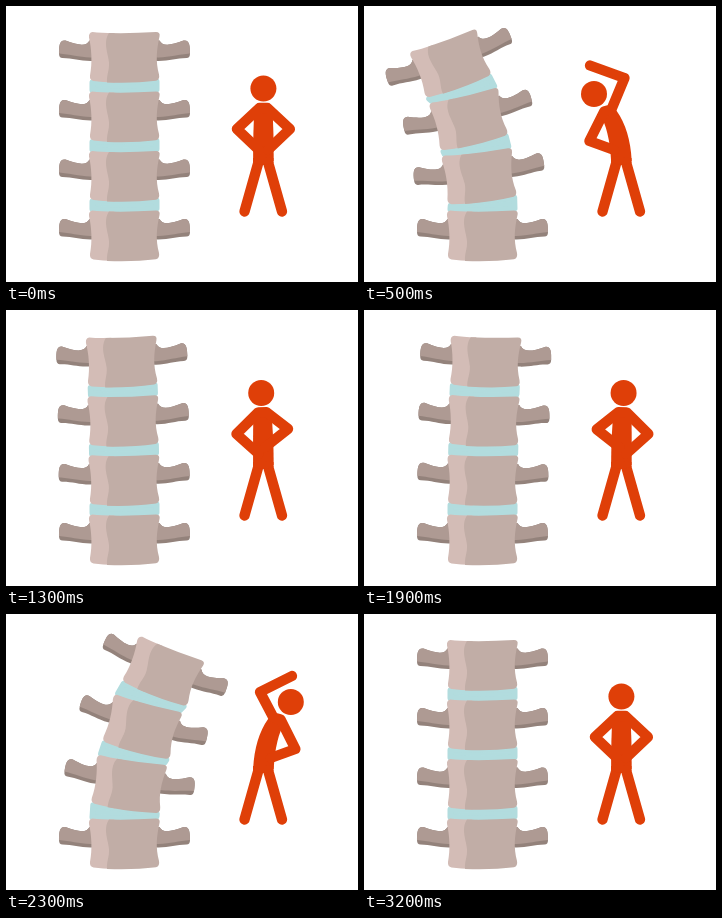
These frames come from a looping animation (352 px wide and 276 px high, 3600 ms). An HTML page:

```html
<!DOCTYPE html>
<html lang="en">
<head>
<meta charset="utf-8">
<title>Side bends</title>
<style>
  html, body { margin: 0; width: 100%; height: 100%; overflow: hidden; background: #fff; }
  svg { display: block; width: 100vw; height: 100vh; }
</style>
</head>
<body>
<svg viewBox="0 0 352 276">
  <defs>
    <g id="process">
      <path fill="#93827b" d="M-28-8H-35C-38-2-46-3-59-8C-65-9-65.500-3-65.500 5Q-65.500 9.500-62 9.500C-52 9.500-45 12.500-34 12.500H-28Z"/>
      <path fill="#ae9a93" d="M-28-8H-35C-38-2-46-3-59-8C-65-9-65.500-3-65.500 5C-54 6-46 8.500-34 9H-28Z"/>
    </g>
    <g id="vertebra">
      <use href="#process"/>
      <use href="#process" transform="scale(-1 1)"/>
      <path fill="#d3bcb6" d="M-32-16.500Q-24-15.500-10-15.500V34Q-22 33.500-31 32.500Q-35 31.500-34.500 27C-32 14-33 0-35.500-11Q-36-16-32-16.500Z"/>
      <path fill="#c1ada6" d="M-15.500-15.500Q8-15 31.500-16.500Q36-16.500 35-12C32 2 31 12 34.500 26Q35.500 31 31.500 32.300Q10 35-17.500 34C-18 26-15 22-15.500 14C-16 6-22-6-15.500-15.500Z"/>
    </g>
  </defs>
  <g id="discs" fill="#b2dcde" stroke="#b2dcde" stroke-width="6" stroke-linejoin="round"></g>
  <g id="spine"></g>
  <g fill="#df3f08" stroke="#df3f08" stroke-width="10.300" stroke-linecap="round" stroke-linejoin="round">
    <g id="upper">
      <path id="torso" stroke="none"/>
      <circle id="head" r="13" stroke="none"/>
      <path id="arms" fill="none"/>
    </g>
    <path d="M238.500 205.500L252.500 156M276 205.500L262 156" fill="none"/>
    <path d="M247 152H267.500V157L257.300 159L247 157Z" stroke="none"/>
  </g>
</svg>
<script>
const LOOP = 3600, MOVE = 900, REST = 100, STEP = 100, STEPS = 5;
const SPINE_X = 118.5, SPINE_Y = 42.5, GAP = 59.5;
const PERSON_X = 257.4;

// The spine leans along shift * level^curve; elbow and hand belong to the raised arm.
const LEFT = { sign: -1, shift: 3.9, curve: 1.98, turn: 6.6, elbow: [3.1, 72], hand: [-31.4, 59.5] };
const RIGHT = { sign: 1, shift: 5.5, curve: 1.84, turn: 8.6, elbow: [3.4, 78], hand: [-28.6, 62] };

// Person drawn leaning left, x measured from its middle; right is the mirror image.
const ARM = [[-4.4, 144], [-26.5, 123], [-4, 102]];
const ARM_LEAN = [[-7.2, 144], [-32, 135], [-17.2, 105.5]];
const SHOULDER_LEAN = [-10, 103.5];

const $ = id => document.getElementById(id);
const flip = ([x, y]) => [-x, y];
const mix = (a, b, p) => a.map((v, i) => v + (b[i] - v) * p);
const text = ([x, y]) => x.toFixed(2) + " " + y.toFixed(2);
const easeInOut = t => t < 0.5 ? 2 * t * t : 1 - 2 * (1 - t) ** 2;

function add(parent, tag, attrs = {}) {
  const el = document.createElementNS("http://www.w3.org/2000/svg", tag);
  for (const key in attrs) el.setAttribute(key, attrs[key]);
  return parent.appendChild(el);
}

const discs = Array.from({ length: 3 }, () => add($("discs"), "path"));
const bones = Array.from({ length: 4 }, () => add($("spine"), "use", { href: "#vertebra" }));

function place({ x, y, angle }, [px, py]) {
  const a = angle * Math.PI / 180;
  return [x + px * Math.cos(a) - py * Math.sin(a), y + px * Math.sin(a) + py * Math.cos(a)];
}

function drawSpine(side, p) {
  const poses = bones.map((bone, i) => {
    const level = bones.length - 1 - i;
    return {
      x: SPINE_X + side.sign * side.shift * level ** side.curve * p,
      y: SPINE_Y + GAP * i + 0.83 * level ** 2 * p,
      angle: level && side.sign * side.turn * level ** (side.curve - 1) * p
    };
  });
  poses.forEach(({ x, y, angle }, i) =>
    bones[i].setAttribute("transform", `translate(${x} ${y}) rotate(${angle})`));
  discs.forEach((disc, i) => {
    const above = (x, y) => text(place(poses[i], [x, y]));
    const below = (x, y) => text(place(poses[i + 1], [x, y]));
    disc.setAttribute("d",
      `M${above(-32, 34)}L${above(32, 33)}L${below(32, -18.5)}Q${below(0, -15)} ${below(-32, -18)}Z`);
  });
}

function drawPerson(side, p) {
  const rest = [...ARM, ...ARM.map(flip).reverse()];
  const lean = [...ARM_LEAN, SHOULDER_LEAN, side.elbow, side.hand];
  const arms = rest.map((point, i) => mix(point, lean[i], p));
  const [, , [lx, ly], [rx, ry]] = arms;
  const waist = -1.5 * p;
  $("upper").setAttribute("transform", `translate(${PERSON_X}) scale(${-side.sign} 1)`);
  $("head").setAttribute("cx", -27.4 * p);
  $("head").setAttribute("cy", 82.5 + 5.5 * p);
  $("arms").setAttribute("d", "M" + arms.map(text).join("L"));
  $("torso").setAttribute("d",
    `M${lx - 5} ${ly + 1}Q${waist - 10.3} 124-10.3 155H10.3Q${waist + 10.3} 124 ${rx + 5} ${ry + 1}Z`);
}

function frame(now) {
  const time = (now + LOOP - REST) % LOOP;
  const move = Math.floor(time / MOVE);
  const step = Math.min(STEPS, Math.floor(time % MOVE / STEP) + 1);
  const eased = easeInOut(step / STEPS);
  const bend = move % 2 ? 1 - eased : eased;
  const side = move < 2 ? LEFT : RIGHT;
  drawSpine(side, bend);
  drawPerson(side, bend);
}

const start = performance.now();
function tick() {
  frame(performance.now() - start);
  requestAnimationFrame(tick);
}
tick();
</script>
</body>
</html>
```
